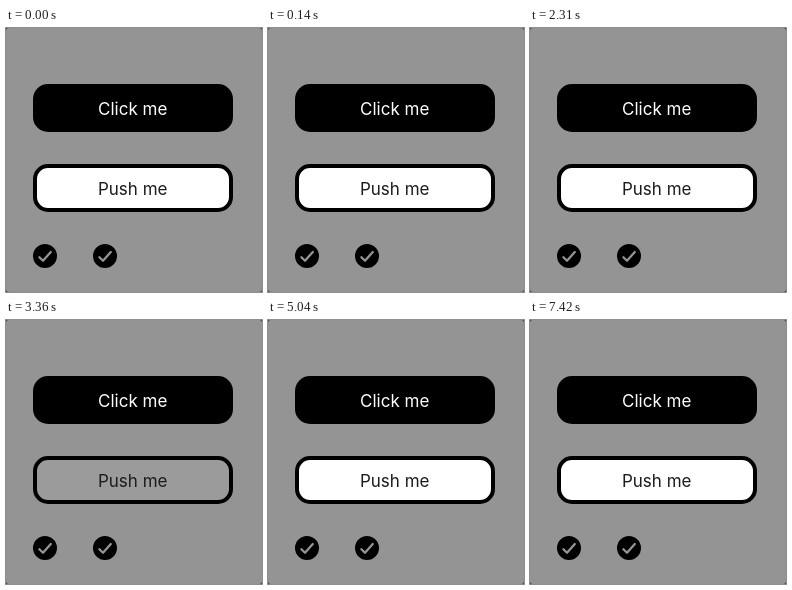
These frames come from a looping animation (256 by 264 pixels, 8 s). An HTML page:

```html
<!DOCTYPE html>
<html lang="en">
<head>
<meta charset="utf-8">
<title>Buttons and checks</title>
<style>
  html, body { margin: 0; width: 100%; height: 100%; overflow: hidden; background: #444; }
  svg { display: block; width: 256px; height: 264px; }
  text { font: 400 17px Inter, "Liberation Sans", sans-serif; text-anchor: middle; }
  .tick { fill: none; stroke: #949494; stroke-width: 2.3; stroke-linecap: round; stroke-linejoin: round; }
</style>
</head>
<body>
<svg viewBox="0 0 256 264">
  <rect width="256" height="264" rx="3" fill="#949494"/>
  <rect id="click" x="27" y="56" width="200" height="48" rx="15"/>
  <text id="clickText" x="126.7" y="86.5">Click me</text>
  <rect id="push" x="29" y="138" width="196" height="44" rx="13" stroke="#000" stroke-width="4"/>
  <text x="126.7" y="166.5" fill="#1c1c1c">Push me</text>
  <g id="first" transform="translate(39 228)">
    <circle stroke="#000" stroke-width="2"  r="11"/>
    <path class="tick" d="M-5.6 1.2 -2 4.8 5.8 -4"/>
  </g>
  <g id="second" transform="translate(99 228)">
    <circle stroke="#000" stroke-width="2" r="11"/>
    <path class="tick" d="M-5.6 1.2 -2 4.8 5.8 -4"/>
  </g>
</svg>
<script>
  const LOOP = 8000;
  const el = id => document.getElementById(id);
  const within = (t, from, to) => t >= from && t < to;

  function setCheck(id, checked) {
    const [disc, tick] = el(id).children;
    disc.setAttribute("fill", checked ? "#000" : "none");
    tick.setAttribute("visibility", checked ? "visible" : "hidden");
  }

  function draw(t) {
    const clicked = within(t, 2240, 2310);
    el("click").setAttribute("fill", clicked ? "#fff" : "#000");
    el("clickText").setAttribute("fill", clicked ? "#1c1c1c" : "#fff");
    el("push").setAttribute("fill", within(t, 3360, 3710) ? "#9b9b9b" : "#fff");
    setCheck("first", !within(t, 4620, 5040) && !within(t, 7000, 7420));
    setCheck("second", !within(t, 5740, 6160));
  }

  const start = performance.now();
  function frame() {
    draw((performance.now() - start) % LOOP);
    requestAnimationFrame(frame);
  }
  frame();
</script>
</body>
</html>
```
